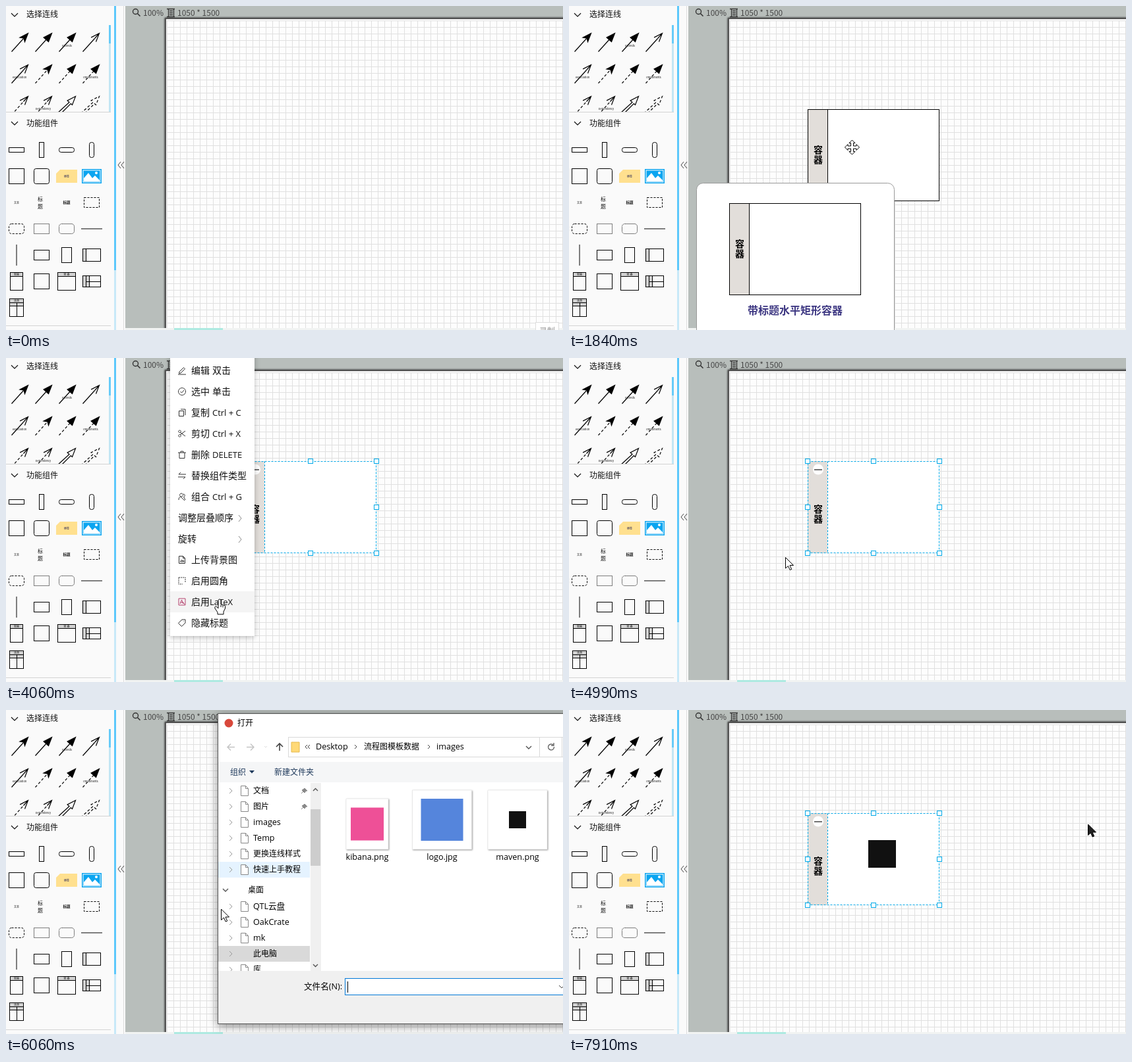
Recreate the animation shown at these times as an HTML page. Size 845 px wide and 493 px high, loop 8000 ms.

```html
<!DOCTYPE html>
<html lang="zh-CN">
<head>
<meta charset="utf-8">
<style>
html, body { margin: 0; width: 100%; height: 100%; overflow: hidden; background: #b8bebb; }
svg { display: block; font-family: "Noto Sans CJK SC", "Noto Sans CJK", sans-serif; }
text { stroke: none; white-space: pre; }
.ui { font-family: "Open Sans", "Noto Sans CJK SC", "Noto Sans CJK", sans-serif; }
.page { filter: drop-shadow(0 0 1.5px #000); }
.menu { filter: drop-shadow(0 2px 4px #0004); }
.window { filter: drop-shadow(0 3px 7px #0007); }
.card { filter: drop-shadow(1px 1px 1px #0006); }
</style>
</head>
<body>
<svg id="stage" width="845" height="493" viewBox="0 0 845 493" fill="none" stroke="#000"></svg>
<script>
const rect = (x, y, w, h, a = '') => `<rect x="${x}" y="${y}" width="${w}" height="${h}" ${a}/>`;
const fill = (x, y, w, h, color, a = '') => rect(x, y, w, h, `fill="${color}" stroke="none" ${a}`);
const path = (d, a = '') => `<path d="${d}" ${a}/>`;
const circle = (x, y, r, a = '') => `<circle cx="${x}" cy="${y}" r="${r}" ${a}/>`;
const text = (x, y, s, size = 12, a = '') =>
  `<text x="${x}" y="${y}" font-size="${size}" ${/fill=/.test(a) ? '' : 'fill="#111"'} ${a}>${s}</text>`;
const group = (body, a = '') => `<g ${a}>${body}</g>`;
const at = (x, y, body, a = '') => group(body, `transform="translate(${x} ${y})" ${a}`);
const mid = 'text-anchor="middle"';

// Connector palette: head shape, dash flag, label
function connectors() {
  const heads = {
    swept: 'M25 0L20 13 18.5 7.3 12.6 6.4z',
    tri: 'M25 0L20 13 12.6 6.4z',
    open: 'M20 13L25 0 12.6 6.4M25 0L18 8',
    block: 'M-3 26L15.5 9 12.6 6.4 25 0 20 13 17.8 11 0 29'
  };
  const list = [
    ['swept'], ['tri'], ['tri', 0, 'Extends'], ['open'],
    ['open', 0, 'Association'], ['swept', 1], ['tri', 1], ['tri', 1, 'Implements'],
    ['open', 1], ['open', 1, 'Dependency'], ['block'], ['block', 1]
  ];
  return list.map(([head, dashed, label], i) => {
    const dash = dashed ? 'stroke-dasharray="4 3"' : '';
    const solid = head == 'swept' || head == 'tri';
    const body = (head == 'block' ? '' : path('M0 28L18 8', dash)) +
      path(heads[head], solid ? 'fill="#000"' : head == 'block' ? dash : '') +
      (label ? text(12, 20, label, 4, mid) : '');
    return at(8.5 + i % 4 * 36, 41.5 + (i >> 2) * 48, body, 'stroke-width="1.2"');
  }).join('');
}

function widgets() {
  const dash = 'stroke-dasharray="3 2"', dots = 'stroke-dasharray="1 1"', r4 = 'rx="4"';
  const gray = '#d2d2d2';
  return rect(4.5, 215.5, 23, 7) + rect(50.5, 207.5, 7, 23) +
    rect(80.5, 215.5, 23, 7, 'rx="3"') + rect(126.5, 207.5, 7, 23, 'rx="3"') +
    rect(4.5, 247.5, 23, 23) + rect(42.5, 247.5, 23, 23, 'rx="3"') +
    path('M82 249H108V269H76V255z', 'fill="#ffe08f" stroke="none"') + text(92, 261, '便签', 4, mid + ' fill="#225"') +
    fill(115, 248, 30, 22, '#0ba5f0') + rect(117, 250, 26, 18, 'stroke="#fff"') +
    path('M118 267V262L125 254 131 262 135 258 142 265V267z', 'fill="#fff" stroke="none"') +
    circle(137, 254, 2, 'fill="#fff" stroke="none"') +
    text(16, 301, '文本', 4, mid) + text(52, 297, '标', 8, mid) + text(52, 308, '题', 8, mid) +
    text(92, 301, '标题', 5.5, mid + ' font-weight="bold"') +
    rect(118.5, 291.5, 23, 15, dash) + rect(4.5, 331.5, 23, 15, r4 + dash) +
    rect(42.5, 331.5, 23, 15, dots) + rect(80.5, 331.5, 23, 15, r4 + dots) +
    path('M114 339H146M16 363V395', 'stroke="#555" stroke-width="1.5"') +
    rect(42.5, 371.5, 23, 15) + rect(84.5, 367.5, 15, 23) +
    fill(116, 369, 5, 20, gray) + rect(116.5, 369.5, 27, 19) + path('M121.5 369V389') +
    fill(6, 405, 20, 6, gray) + rect(6.5, 405.5, 19, 27) + path('M6 411.5H26') + text(16, 410, '容器', 4, mid) +
    rect(42.5, 407.5, 23, 23) +
    fill(78, 405, 28, 6, gray) + rect(78.5, 405.5, 27, 27) + path('M78 411.5H106') + text(92, 410, '容 器', 4, mid) +
    fill(116, 410, 10, 18, gray) + rect(116.5, 410.5, 27, 17) + path('M121.5 410V428M126.5 410V428M121 419.5H144') +
    fill(5, 445, 22, 11, gray) + rect(5.5, 445.5, 21, 27) + path('M5 451.5H27M5 456.5H27M16.5 451V473') +
    text(16, 450, '泳池', 4, mid);
}

const chevron = (x, y) => path(`M${x - 5} ${y - 2.5}l5 5 5-5`, 'stroke="#111" stroke-width="1.2"');

function sidePanel() {
  return fill(0, 0, 181, 493, '#fafafa') + connectors() +
    fill(0, 161, 160, 332, '#fafafa') + path('M0 161.5H159M0 486.5H159', 'stroke="#d4d4d4"') +
    fill(156, 29, 3, 132, '#c3e6f4') + fill(156, 29, 3, 28, '#67cbf8') +
    fill(164, 0, 3, 493, '#c8e9f8') + fill(164, 0, 3, 402, '#5cc8fb') +
    path('M178.5 0V493', 'stroke="#ddd"') +
    chevron(13, 13.5) + text(31, 17, '选择连线') +
    chevron(13, 178.5) + text(31, 183, '功能组件') +
    widgets() + path('M174 237l-4 5 4 5M179 237l-4 5 4 5', 'stroke="#444"');
}

function workspace() {
  return `<pattern id="grid" x="254" y="32" width="10" height="10" patternUnits="userSpaceOnUse">
    <path d="M.5 0V10M0 .5H10" stroke="#e0e0e0"/></pattern>` +
    fill(181, 0, 664, 493, '#b8bebb') +
    rect(242, 19, 700, 600, 'class="page" fill="#fff" stroke="#555" stroke-width="2"') +
    fill(244, 21, 601, 472, '#fdfdfd') + fill(244, 22, 601, 471, 'url(#grid)') +
    fill(181, 490, 664, 3, '#f1f3f2') + fill(255, 490, 74, 3, '#aeeae1') +
    circle(196.5, 8.5, 4, 'stroke="#333" stroke-width="1.4"') + path('M199.5 11.5l4 4', 'stroke="#333" stroke-width="1.6"') +
    text(208, 15, '100%', 12, 'fill="#444"') +
    path('M244 4.5h12M244 16.5h12M246.5 4V17M254.5 4V17M248 7.5h5M248 10.5h5M248 13.5h5', 'stroke="#333" stroke-width="1.3"') +
    text(260, 15, '1050 * 1500', 12, 'fill="#444"');
}

// Titled container with its top left corner at 0,0
const container = (labelY, a = '') =>
  fill(0, 0, 200, 140, '#fff') + fill(0, 0, 30, 140, '#e2deda') +
  rect(.5, .5, 199, 139, a) + path('M30.5 0V140', a) +
  ['容', '器'].map((c, i) => text(16, labelY + i * 15, c, 14, mid + ' font-weight="bold" fill="#000"')).join('');

function selection() {
  const blue = 'stroke="#00a9e8"';
  let s = container(78, blue + ' stroke-dasharray="3 2"') +
    circle(16, 12.5, 8, 'fill="#fff" stroke="none"') + path('M10 13H22', 'stroke="#444" stroke-width="1.5"') +
    fill(92, 41, 42, 42, '#111', 'id="mark"');
  for (const x of [0, 100, 200]) for (const y of [0, 70, 140])
    if (x != 100 || y != 70) s += rect(x - 3.5, y - 3.5, 7, 7, 'fill="#fff" ' + blue);
  return s;
}

const popup = () =>
  rect(193.5, 269.5, 300, 240, 'rx="10" fill="#fff" stroke="#999"') +
  at(243, 300, container(67)) +
  text(343, 469, '带标题水平矩形容器', 16, mid + ' font-weight="bold" fill="#3d3782"');

function menu() {
  const items = [
    ['编辑', '双击', 'M2 8L8.5 1.5l2 2L4 10 1.5 10.5zM0 12h12'],
    ['选中', '单击', 'M6 .5a5.5 5.5 0 1 0 .1 0M3.5 6l2 2L9 4'],
    ['复制', 'Ctrl + C', 'M1.5 3.5h7v8h-7zM4 1h7v9'],
    ['剪切', 'Ctrl + X', 'M3 4l8 6M3 8l8-6M2.5 1a1.8 1.8 0 1 0 .1 0M2.5 7.5a1.8 1.8 0 1 0 .1 0'],
    ['删除', 'DELETE', 'M0 3h12M4 3V1h4v2M2 3v8.5h8V3'],
    ['替换组件类型', '', 'M12 4H1l3-3M0 8h11l-3 3'],
    ['组合', 'Ctrl + G', 'M5 1a2.5 2.5 0 1 0 .1 0M1 11c0-6 4-5 5-3l4 4M8 2c3 0 3 4 0 5M9 7l2 4'],
    ['调整层叠顺序'], ['旋转'],
    ['上传背景图', '', 'M1.5.5h6l3 3v8h-9zM7.5.5v3h3M3.5 9l2-3 1.5 2 1-1 1 2z'],
    ['启用圆角', '', 'M1 1h10v7M1 1v10h6'],
    ['启用', 'LaTeX', 'M1 1h10v10H1zM3 9l2.5-6L8 9M4 7h3M7 6l3 4'],
    ['隐藏标题', '', 'M6 1h5v5l-5.5 5.5-5-5zM8.5 3.5h.5']
  ];
  return rect(249, -20, 128, 443, 'class="menu" fill="#fff" stroke="none"') +
    fill(249, 0, 128, 32, '#f4f4f4', 'id="hover"') +
    items.map(([name, key, icon], i) => {
      const y = 19 + i * 32;
      if (!icon) return text(261, y + 5, name, 14) + path(`M353 ${y - 4}l4 5-4 5`, 'stroke="#888"');
      const color = i == 11 ? '#b5436e' : '#333';
      const latin = /[A-Z]/.test(key);
      return at(261, y - 6, path(icon, `stroke="${color}" ${i == 10 ? 'stroke-dasharray="2 1"' : ''}`)) +
        text(281, y + 5, name, 14) +
        text(key == 'LaTeX' ? 309 : 313, y + 5, key, latin ? 13 : 14, 'class="ui"');
    }).join('');
}

// ---- File dialog ----
const label = (x, y, s, a = '') => text(x, y + 4, s, /[a-z]/i.test(s) ? 12.6 : 12, a || 'fill="#000"');
const small = (x, y, a = 'stroke="#999"') => path(`M${x - 2} ${y - 4}l4 4-4 4`, a);
const down = (x, y, a = 'stroke="#555" stroke-width="1.4"') => path(`M${x - 4} ${y - 2}l4 4 4-4`, a);
const sheet = (x, y) => path(`M${x + .5} ${y - 7.5}h7l4 4v11h-11zM${x + 7.5} ${y - 7.5}v4h4`, 'fill="#fff" stroke="#888"');

function quickTree() {
  const rows = ['文档', '图片', 'images', 'Temp', '更换连线样式', '快速上手教程'];
  const rest = ['QTL云盘', 'OakCrate', 'mk', '此电脑', '库'];
  const row = (s, y) => small(341, y) + (s == '此电脑' ? '' : sheet(356, y)) + label(375, y, s);
  const pin = y => path(`M453 ${y - 4}l4 4-2 0-2 3-4-4 3-2zM451 ${y + 1}l-3 3`, 'fill="#888" stroke="#888"');
  return fill(322, 231, 139, 24, '#e5f3ff') + fill(322, 359, 139, 24, '#d9d9d9') +
    rows.map((s, i) => row(s, 123 + i * 24)).join('') + pin(123) + pin(147) +
    down(333, 274) + label(367, 274, '桌面') +
    rest.map((s, i) => row(s, 299 + i * 24)).join('') + fill(462, 151, 15, 86, '#cdcdcd');
}

function deviceTree() {
  const blue = 'fill="#1e90e0" stroke="none"';
  const drive = path('M1 9l2-3h10l2 3v4H1z', 'fill="#555" stroke="none"') + path('M2 9.5h12', 'stroke="#ccc"');
  const rows = [
    ['QTL云盘', circle(8, 8, 6, blue)],
    ['3D 对象', path('M1 4l7-3 7 3v8l-7 3-7-3z', 'fill="#35b1e1" stroke="none"') + path('M1 4l7 3v8l-7-3z', blue)],
    ['Desktop', rect(0, 2, 16, 12, blue) + path('M1 12L8 4h7', 'stroke="#5cc0ff"')],
    ['视频', rect(1.5, 1.5, 13, 13, 'fill="#777" stroke="#333"') + path('M3.5 1v14M12.5 1v14', 'stroke="#fff" stroke-dasharray="2 1"')],
    ['图片', rect(.5, 3.5, 15, 10, 'fill="#fff" stroke="#888"') + path('M2 12V8l4-2 8 4v2z', 'fill="#3c8fc0" stroke="none"')],
    ['文档', path('M2.5.5h8l3 3v12h-11z', 'fill="#fff" stroke="#777"') + path('M5 5.5h6M5 8.5h6M5 11.5h6', 'stroke="#2a8bd0"')],
    ['下载', path('M5 1h6v6h4l-7 8-7-8h4z', blue)],
    ['音乐', path('M6 1c1 4 7 4 5 9 0-3-2-3-3-3.5V12a3 2.5 0 1 1-2-2z', blue)],
    ['Systems (C:)', rect(1, 1, 6, 6, blue) + drive],
    ['新加卷 (D:)', drive], ['新加卷 (E:)', drive]
  ];
  return fill(322, 183, 139, 24, '#d9d9d9') +
    down(341, 123, 'stroke="#999"') + rect(354.5, 116.5, 15, 10, 'fill="#4ab3ee" stroke="#567"') +
    path('M357 129.5h10', 'stroke="#567" stroke-width="2"') + label(375, 123, '此电脑') +
    rows.map(([s, icon], i) => {
      const y = 147 + i * 24;
      return small(349, y) + at(362, y - 8, icon) + label(383, y, s);
    }).join('') + fill(462, 204, 15, 64, '#cdcdcd');
}

function file(x, name, w, h, size, color) {
  return rect(x - w / 2, 212 - h, w, h, 'class="card" fill="#fff" stroke="#ddd" stroke-width=".5"') +
    fill(x - size / 2, 212 - h / 2 - size / 2, size, size, color) + label(x, 224, name, mid + ' fill="#000"');
}

function dialog() {
  const navy = 'fill="#1e395b"';
  const frame = rect(321.5, 5.5, 600, 472, 'class="window" fill="#fff" stroke="#555"') +
    circle(338, 20, 6.5, 'fill="#d8483b" stroke="none"') + label(351, 20, '打开') +
    fill(322, 79, 523, 31, '#f5f6f7') + fill(322, 397, 523, 80, '#f0f0f0');
  const address = path('M347 56.5h-11m5-5l-5 5 5 5M365 56.5h11m-5-5l5 5-5 5', 'stroke="#c4c4c4" stroke-width="1.4"') +
    down(394, 56, 'stroke="#bbb" transform="translate(197 28) scale(.5)"') +
    path('M415 62V51m-5 5l5-5 5 5', 'stroke="#444" stroke-width="1.6"') +
    rect(428.5, 41.5, 420, 30, 'stroke="#d9d9d9"') + path('M809.5 41V72M843.5 41V72', 'stroke="#d9d9d9"') +
    path('M433 49h12v15h-12z', 'fill="#ffd977" stroke="#e5b94d"') +
    path('M457 53l-3 3 3 3M461 53l-3 3 3 3M529 53l3 3-3 3M640 53l3 3-3 3', 'stroke="#444"') +
    label(470, 56, 'Desktop') + label(543, 56, '流程图模板数据') + label(653, 56, 'images') + down(793, 57) +
    path('M830 53a4.5 4.5 0 1 0 1.5 3M831 50v4h-4', 'stroke="#666" stroke-width="1.4"');
  const tools = label(340, 95, '组织', navy) + path('M369 92h8l-4 4.5z', navy + ' stroke="none"') +
    label(407, 95, '新建文件夹', navy);
  const files = fill(610, 117, 105, 118, '#e5f3ff', 'id="fileHover"') +
    file(548, 'kibana.png', 64, 77, 50, '#ee5097') +
    file(661.5, 'logo.jpg', 90, 90, 64, '#5585dc') +
    file(776, 'maven.png', 90, 90, 26, '#111');
  const footer = fill(322, 397, 523, 80, '#f0f0f0') + label(452, 421, '文件名(N):') +
    rect(514.5, 408.5, 400, 25, 'fill="#fff" stroke="#0078d7"') + down(843, 421, 'stroke="#444"') +
    path('M518.5 413V430', 'id="caret"');
  return frame + group(address + tools + fill(462, 111, 16, 286, '#f0f0f0') +
    group(quickTree(), 'id="quick"') + group(deviceTree(), 'id="devices"') +
    path('M466 123l3.5-3.5 3.5 3.5M466 387l3.5 3.5 3.5-3.5', 'stroke="#555" stroke-width="1.4"') +
    files + footer, 'id="content"');
}

function cursors() {
  const move = 'M0-11l4.5 4.5H2V-2H6.5V-4.5L11 0 6.5 4.5V2H2V6.5H4.5L0 11-4.5 6.5H-2V2H-6.5V4.5L-11 0-6.5-4.5V-2H-2V-6.5H-4.5z';
  const hand = 'M-2 2C-2-.5 2-.5 2 2V8L8 9.5Q9 10 8.5 14L6 19V23H-3V20L-7 14C-8 11-5 10-4 12L-2 14z';
  return path('M0 0V16.5L4 13l2.7 6 2.5-1L6.5 12H12z', 'id="arrow" fill="#fff"') +
    path(move, 'id="move" fill="#fff"') + path(hand + 'M2 9v3M5 9.5v3', 'id="hand" fill="#fff"');
}

const svg = document.getElementById('stage');
svg.innerHTML = workspace() + sidePanel() +
  group(rect(803.5, 481.5, 35, 20, 'fill="#fff" stroke="#ddd"') + text(809, 499, '录制', 12, 'fill="#999"'), 'id="tip"') +
  group(container(67), 'id="box"') + at(362, 157, selection(), 'id="picked"') +
  group(popup(), 'id="popup"') + group(menu(), 'id="menu"') + group(dialog(), 'id="dialog" class="ui"') +
  circle(342.5, 303.5, 6.5, 'id="busy" stroke="#2a8fd6" stroke-width="3"') + group(cursors(), 'id="cursor"');

const el = {};
svg.querySelectorAll('[id]').forEach(e => el[e.id] = e);
const show = (id, on) => el[id].setAttribute('visibility', on ? 'inherit' : 'hidden');

// Pointer track: time, x, y
const track = [
  [0, 520, 520], [200, 520, 520], [780, 122, 382], [910, 122, 382], [1040, 135, 382], [1310, 357, 338],
  [1840, 429.5, 215], [2230, 412, 218], [2750, 377.5, 201], [3020, 377.5, 201], [3670, 325, 368],
  [4060, 324, 367], [4320, 330, 306], [4600, 328.5, 303.5], [5520, 328.5, 303.5], [6060, 326.5, 303],
  [6300, 326.5, 303], [6860, 665.5, 171.5], [7050, 665.5, 171.5], [7600, 787.5, 174], [8001, 787.5, 174]
];
function pointer(t) {
  const i = track.findIndex(k => k[0] > t);
  const [t0, x0, y0] = track[i - 1], [t1, x1, y1] = track[i];
  const p = (t - t0) / (t1 - t0), e = p * p * (3 - 2 * p);
  return [x0 + (x1 - x0) * e, y0 + (y1 - y0) * e];
}
const snap = (v, base) => base + Math.round((v - base) / 10) * 10;

function render(t) {
  const within = (a, b) => t >= a && t < b;
  const [x, y] = pointer(t);
  show('tip', t < 130);
  show('popup', within(780, 2100));
  show('box', within(1450, 2100));
  el.box.setAttribute('transform', `translate(${snap(x - 67, 362)} ${snap(y - 58, 157)})`);
  show('picked', t >= 2100);
  show('mark', t >= 7780);
  show('menu', within(2890, 4600));
  el.menu.setAttribute('opacity', Math.min(1, (t - 2890) / 130 + .3, (4600 - t) / 130));
  el.hover.setAttribute('y', 3 + Math.floor((y - 3) / 32) * 32);
  show('hover', x < 377);
  show('dialog', within(5520, 7780));
  show('content', t >= 5790);
  show('quick', t < 6300);
  show('devices', t >= 6300);
  const second = x >= 724;
  el.fileHover.setAttribute('x', second ? 724 : 610);
  show('fileHover', second || x >= 610 && x < 715);
  show('caret', within(5790, 6470) || within(7000, 7530));
  show('busy', within(5380, 5520));
  const kind = within(700, 3020) ? 'move' : within(3020, 4470) ? 'hand' : 'arrow';
  for (const k of ['arrow', 'move', 'hand']) show(k, k == kind);
  el.arrow.setAttribute('fill', t >= 7780 ? '#222' : '#fff');
  el.cursor.setAttribute('transform', `translate(${x} ${y})`);
}

// 'inherit' keeps nested parts hidden with their parent
const start = performance.now();
(function loop() {
  render((performance.now() - start) % 8000);
  requestAnimationFrame(loop);
})();
</script>
</body>
</html>
```
